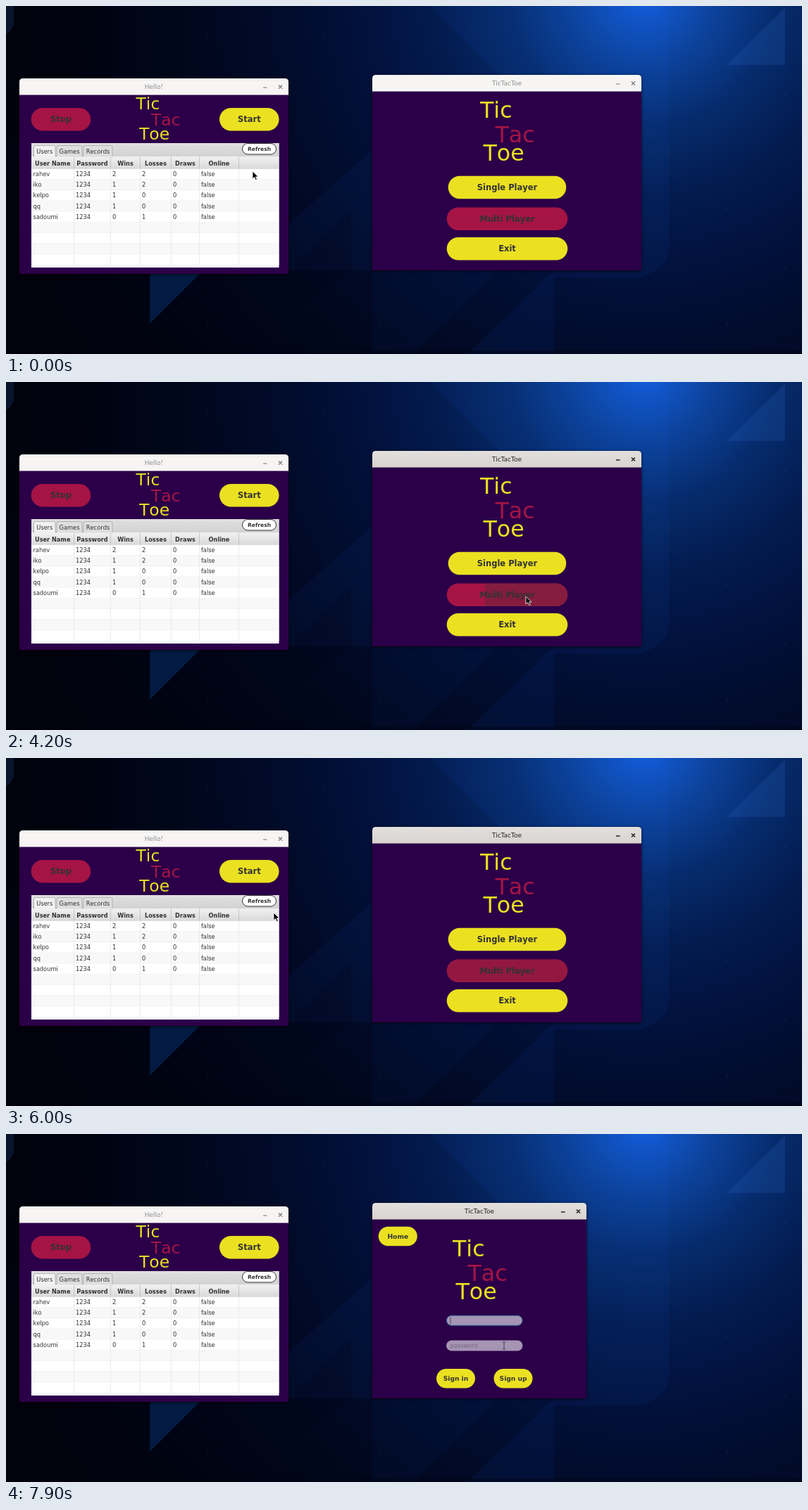
An HTML page that plays this animation: 1130x495 px, repeating every 8000 ms.

```html
<!DOCTYPE html>
<html lang="en">
<head>
<meta charset="utf-8">
<title>TicTacToe</title>
<style>
html, body { margin: 0; width: 100%; height: 100%; overflow: hidden; background: #00020d }
svg { display: block; width: 1130px; height: 495px; font: 8.3px "DejaVu Sans", sans-serif; font-kerning: none }
text { fill: #333; white-space: pre }
.mid { text-anchor: middle }
.bold { font-weight: bold }
.window { filter: drop-shadow(0 1px 2px #000b) }
.bar { fill: #f6f5f4 }
.title { font-size: 9px; font-kerning: normal; fill: #8b8b8b }
.icon { stroke: #777; stroke-width: 1.2; fill: none }
.active .bar { fill: url(#barFill) }
.active .title { fill: #222 }
.active .icon { stroke: #222; stroke-width: 1.5 }
</style>
</head>
<body>
<svg id="stage" viewBox="0 0 1130 495"></svg>
<script>
const YELLOW = '#ebe121', RED = '#a51445', PURPLE = '#2b0048';
const stage = document.getElementById('stage');

const rect = (x, y, w, h, fill, more = '') =>
  `<rect x="${x}" y="${y}" width="${w}" height="${h}" fill="${fill}" ${more}/>`;
const poly = (points, fill, opacity) =>
  `<polygon points="${points}" fill="${fill}" opacity="${opacity}"/>`;
const text = (x, y, s, cls = '', style = '') =>
  `<text x="${x}" y="${y}" class="${cls}" style="${style}">${s}</text>`;
const stops = colors => colors.map((c, i) =>
  `<stop offset="${i / (colors.length - 1)}" stop-color="${c}"/>`).join('');
const gradient = (id, ...colors) =>
  `<linearGradient id="${id}" x2="0" y2="1">${stops(colors)}</linearGradient>`;

// Pill button around a centre; an optional ripple lies between its face and its label.
function button(cx, cy, w, h, label, fill, size = 11.5, ripple = '', rippleFill = '') {
  const pill = (color, more = '') => rect(cx - w / 2, cy - h / 2, w, h, color, `rx="${h / 2}" ${more}`);
  return pill(fill) + (ripple && pill(rippleFill, `id="${ripple}" opacity="0"`)) +
    text(cx, cy + size * .36, label, 'mid bold', `font-size:${size}px`);
}

function frame(x, y, w, h, title, body, minimize = true) {
  const right = x + w, mid = y + 12;
  return rect(x, y + 8, w, h - 8, body) +
    `<path class="bar" d="M${x} ${y + 23.5}v-18.5q0-5 5-5h${w - 10}q5 0 5 5v18.5z"/>` +
    text(x + w / 2, y + 15, title, 'title mid') +
    `<path class="icon" d="M${right - 14} ${mid - 2.5}l5 5m0-5l-5 5${minimize ? `M${right - 36} ${mid + 1}h5.5` : ''}"/>`;
}

function logo(x, y, size, tacDrop, toeDrop) {
  const word = (dx, dy, s, fill) => text(x + dx, y + dy, s, '', `font-size:${size}px;fill:${fill}`);
  return word(0, 0, 'Tic', YELLOW) + word(21.5, tacDrop, 'Tac', RED) + word(4.5, toeDrop, 'Toe', YELLOW);
}
const bigLogo = (x, y) => logo(x, y, 31.7, 34.5, 61);

function background() {
  let stars = '';
  for (let x = 204; x < 1130; x += 82)
    for (let y = 43; y < 495; y += 82)
      if (Math.sin(x * 12.9 + y * 78.2) > .2) stars += rect(x - .5, y, 1.2, 1.2, '#6da0e8', 'opacity=".3"');
  return rect(0, 0, 1130, 495, 'url(#sky)') +
    poly('0,0 155,0 155,95 60,190 0,190', '#000', .15) +
    '<path d="M0 0h11v22q0 12-11 18z" fill="#16305e" opacity=".4"/>' +
    '<path d="M602 0H930Q941 8 941 25V345Q941 374 900 386H778V176z" fill="#1464e0" opacity=".06"/>' +
    poly('1106,2 1023,84 1106,84', '#3474d8', .16) +
    poly('520,205 401,310 401,376 520,376', '#0b3b96', .1) +
    poly('490,290 490,376 401,440 401,376', '#000318', .2) +
    poly('204,376 204,452 280,376', '#0c3f92', .38) +
    poly('778,376 778,495 655,495', '#0a3b91', .13) +
    poly('520,376 700,376 581,495 520,495', '#0a3b91', .07) +
    rect(0, 490, 1130, 5, '#00000c', 'opacity=".35"') + stars;
}

function server() {
  const left = 36, top = 231.6, width = 351.5, step = 15.2;
  const columns = [['User Name', 60.5], ['Password', 52], ['Wins', 42], ['Losses', 44], ['Draws', 40], ['Online', 56]];
  const users = ['rahev 2 2', 'iko 1 2', 'kelpo 1 0', 'qq 1 0', 'sadoumi 0 1']
    .map(row => row.split(' ')).map(([name, wins, losses]) => [name, '1234', wins, losses, 0, 'false']);
  let s = frame(19, 103, 382, 278, 'Hello!', PURPLE) + logo(184.5, 147.3, 23.5, 22.2, 42.7) +
    button(78, 161.2, 84.5, 32.5, 'Stop', RED) +
    button(345.3, 161.2, 84.5, 32.5, 'Start', YELLOW, 11.5, 'startRipple', '#bdb52a') +
    rect(left, 195, width, 177, '#fff') + rect(left, 195, width, 19.5, 'url(#tabs)');

  let x = 39.5;
  for (const [label, w] of [['Users', 30.5], ['Games', 36], ['Records', 41]]) {
    const fill = label === 'Users' ? '#f1f1f1' : '#dedede';
    s += `<path d="M${x} 214.5v-14q0-2 2-2h${w - 4}q2 0 2 2v14" fill="${fill}" stroke="#aaa" stroke-width=".8"/>` +
      text(x + w / 2, 209.5, label, 'mid');
    x += w + 2;
  }

  s += rect(left, 214.5, width, 17, 'url(#head)') + rect(left, 231, width, .7, '#bbb');
  for (let i = 0; i < 9; i++) {
    const y = top + i * step;
    s += rect(left, y, width, step, i % 2 ? '#f8f8f8' : '#fff') + rect(left, y + step - .5, width, .6, '#e9e9e9');
  }
  x = left;
  columns.forEach(([label, w], c) => {
    s += text(x + w / 2, 227, label, 'mid bold', 'font-size:8.2px');
    users.forEach((user, i) => s += text(x + 2.4, top + 10.4 + i * step, user[c]));
    x += w;
    s += rect(x - .4, 214.5, .8, 17, '#bbb') + rect(x - .4, 232, .8, 137, '#e8e8e8');
  });
  return s + rect(335.5, 195.5, 48, 15.5, '#fff', 'rx="7.7" stroke="#333" id="refresh"') +
    rect(340, 197, 37, 13, '#aaa', 'id="refreshRipple"') +
    text(359.5, 206.4, 'Refresh', 'mid bold', 'font-size:7.6px');
}

const menu = () => frame(520, 98, 382, 278, 'TicTacToe', PURPLE) + bigLogo(673, 159) +
  button(711.5, 258, 167.5, 32.5, 'Single Player', YELLOW) +
  button(711.5, 302.7, 171.5, 32.5, 'Multi Player', RED, 11.5, 'multiRipple', '#841c3f') +
  button(711.5, 345.2, 171.5, 32.5, 'Exit', YELLOW);

const login = () => frame(520, 98, 304, 278, 'TicTacToe', PURPLE) + bigLogo(634, 174) +
  button(556.3, 145.5, 55, 27.5, 'Home', YELLOW, 9.2) +
  rect(625.5, 258.3, 107.5, 14, '#a594b3', 'rx="7" stroke="#2f6a9e"') +
  rect(630.6, 260.5, .8, 9.5, '#333') +
  rect(625, 293.5, 108.5, 15, '#a594b3', 'rx="7.5"') +
  text(630.5, 304, 'password', '', 'fill:#75667f') +
  button(638.5, 347.8, 55, 27.5, 'Sign in', YELLOW, 9.1) + button(720, 347.8, 55, 27.5, 'Sign up', YELLOW, 9.1);

const dialog = () => frame(461, 152, 229, 118, 'Warning', '#f4f4f4', false) +
  rect(461, 175.5, 229, 44.5, 'url(#message)') + rect(461, 220, 229, .8, '#d4d4d4') +
  text(468, 202, 'Cannot connect to the server.....', '', 'font-size:9.7px') +
  '<path d="M668 187l13 23h-26z" fill="#c79a32" stroke="#d8d2bd" stroke-width="2.5" stroke-linejoin="round"/>' +
  '<path d="M668 194.5v7.5m0 2.6v2.2" stroke="#fff" stroke-width="2.2"/>' +
  rect(629, 248.5, 54, 15, 'url(#ok)', 'rx="1.5" stroke="#239fd0" stroke-width="1.4"') +
  text(656, 259, 'OK', 'mid');

const group = (id, content) => `<g id="${id}" class="window active">${content}</g>`;
stage.innerHTML = `<defs>
  <radialGradient id="sky" gradientUnits="userSpaceOnUse" cx="905" cy="-20" r="960">
    ${stops(['#145ee0', '#0d449f', '#062b6c', '#031c50', '#02123f', '#010d30', '#010924', '#00061a', '#000414', '#00030f', '#00020c'])}
  </radialGradient>
  ${gradient('barFill', '#e2dfdc', '#d8d4d0')}${gradient('tabs', '#dfdfdf', '#d2d2d2')}
  ${gradient('head', '#f1f1f1', '#d9d9d9')}${gradient('message', '#f8f8f8', '#e9eaea')}
  ${gradient('ok', '#b9dcea', '#8fc3da')}</defs>` +
  background() + group('server', server()) + group('menu', menu()) + group('login', login()) +
  group('dialog', dialog()) +
  `<path id="arrow" d="M0 0V11L2.6 8.6L4.4 12.6L6.3 11.8L4.5 7.9H8Z" fill="#000" stroke="#fff" stroke-width=".8"/>
  <path id="beam" d="M705 296h4m-2 0v10m-2 0h4" fill="none" stroke="#333" stroke-width=".8"/>`;

const part = id => document.getElementById(id);
const within = (t, from, to) => t >= from && t < to;
const show = (id, on) => part(id).style.display = on ? '' : 'none';
const activate = (id, on) => part(id).classList.toggle('active', on);
const ramp = (t, from, to) => Math.max(0, Math.min(1, (t - from) / (to - from)));

// Pointer moves: start time, end time, x and y reached.
const moves = [[0, 900, 697, 312], [1200, 2200, 358, 205], [3700, 3800, 738, 305], [4600, 5400, 672, 245],
  [5700, 6000, 380, 220], [6000, 6300, 345, 163], [6800, 7300, 751, 302]];

function pointer(t) {
  let x = 350, y = 235;
  for (const [from, to, nextX, nextY] of moves) {
    const u = ramp(t, from, to), k = u * u * (3 - 2 * u);
    x += (nextX - x) * k;
    y += (nextY - y) * k;
  }
  return [x, y];
}

function draw(t) {
  const signedIn = t >= 7900, refreshing = within(t, 2300, 3800);
  const firstPress = within(t, 4200, 4500), secondPress = within(t, 7700, 7900);
  const warned = within(t, 4500, 5700);
  activate('server', refreshing || within(t, 3800, 4200) || within(t, 6400, 7700));
  activate('menu', firstPress || secondPress || within(t, 5700, 6400));
  show('menu', !signedIn);
  show('login', signedIn);
  show('dialog', warned);
  show('refreshRipple', refreshing);
  part('refresh').setAttribute('stroke-width', refreshing ? 1.5 : 1);

  const multi = part('multiRipple'), pressed = firstPress || secondPress;
  const sincePress = t - (firstPress ? 4200 : 7700);
  multi.setAttribute('opacity', pressed ? 1 : within(t, 5700, 6400) ? .55 * (1 - ramp(t, 6000, 6400)) : 0);
  multi.style.clipPath = pressed ? `inset(0 0 0 ${Math.max(0, 54 - sincePress * .45)}px)` : 'none';
  part('startRipple').setAttribute('opacity', t < 6400 ? 0 : .8 * (1 - ramp(t, 6700, 7200)));

  show('beam', signedIn);
  show('arrow', !signedIn);
  part('arrow').setAttribute('transform', `translate(${pointer(t)})`);
}

// The screen updates ten times a second.
function tick() {
  draw(Math.floor(performance.now() % 8000 / 100) * 100);
  requestAnimationFrame(tick);
}
tick();
</script>
</body>
</html>
```
